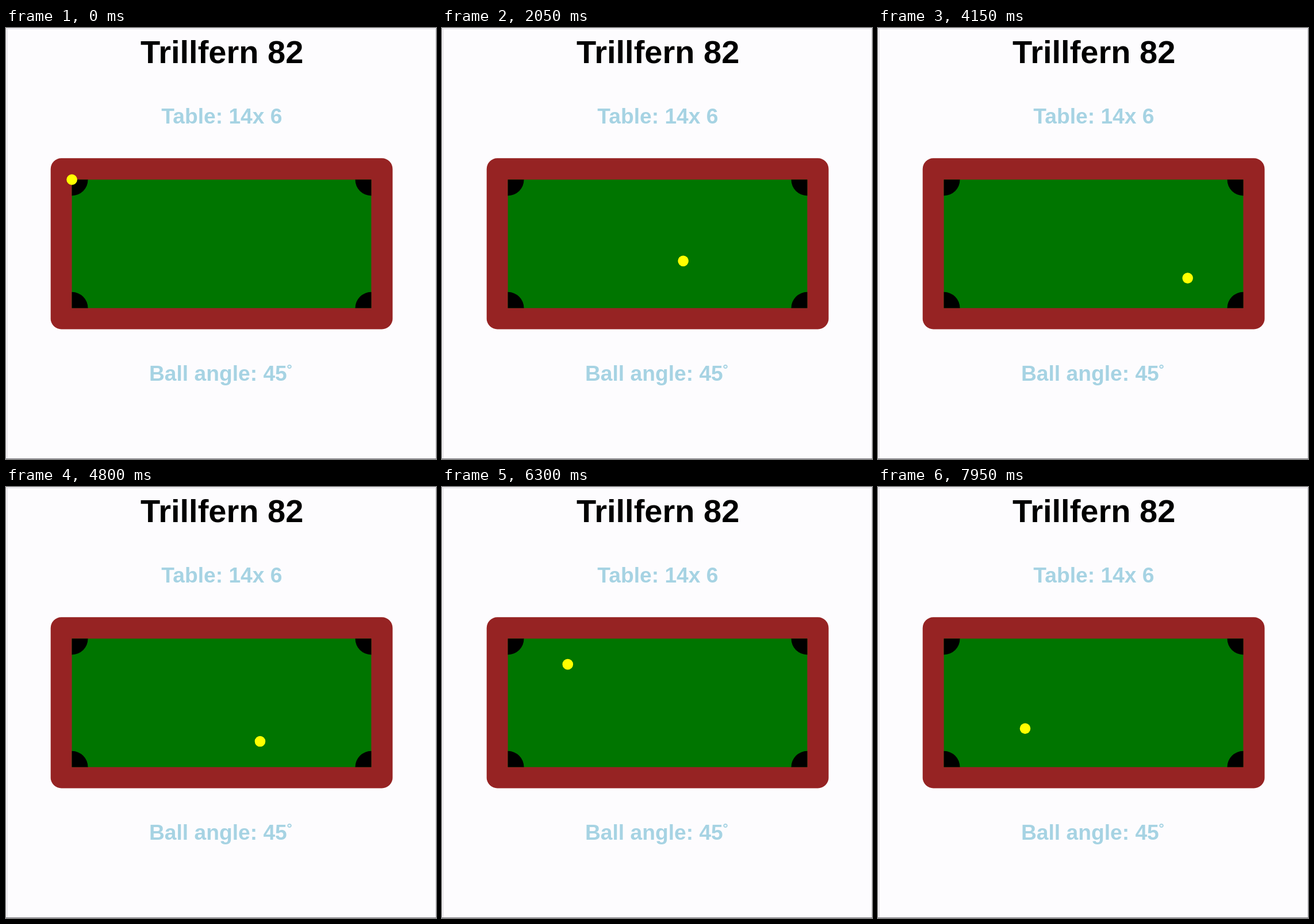
Animation, 748 px wide and 749 px high, one loop 8000 ms. Source, as an HTML page:

```html
<!DOCTYPE html>
<html lang="en">
<head>
<meta charset="utf-8">
<title>Pool table</title>
<style>
  html, body { margin: 0; width: 100%; height: 100%; overflow: hidden; background: #fdfcfe; }
  svg { display: block; width: 100%; height: 100%; }
  text { font: bold 37.2px "Liberation Sans", Arial, sans-serif; fill: #a6d3e3; }
  .title { font-size: 56px; fill: #000; text-anchor: end; }
  .degree { font-size: 30px; }
</style>
</head>
<body>
<svg viewBox="0 0 748 749">
  <defs>
    <clipPath id="felt"><rect x="114.6" y="263.5" width="520.8" height="223.2"/></clipPath>
  </defs>

  <path d="M0 1.5H748M2 1V748M747.5 1V748" fill="none" stroke="#d8d5dc"/>
  <path d="M0 748.5H748" stroke="#77747b"/>

  <text class="title" x="517.3" y="60.5">Trillfern 82</text>
  <text x="270.3" y="165.5">Table: 14x 6</text>
  <text x="249" y="612.5">Ball angle: 45<tspan class="degree" dy="-4">˚</tspan></text>

  <rect x="77.7" y="226.3" width="594.8" height="297.2" rx="18.6" fill="#962323"/>
  <g clip-path="url(#felt)">
    <rect x="114" y="263" width="522" height="225" fill="#007500"/>
    <circle cx="114.6" cy="263.5" r="27.9"/>
    <circle cx="635.4" cy="263.5" r="27.9"/>
    <circle cx="114.6" cy="486.7" r="27.9"/>
    <circle cx="635.4" cy="486.7" r="27.9"/>
  </g>
  <circle id="ball" r="9.3" fill="#ff0"/>
</svg>
<script>
  const LOOP = 8000, STEP = 50;
  const UNIT = 37.2, LEFT = 114.6, TOP = 263.5;
  const COLS = 14, ROWS = 6, SPEED = 0.2; // table units per step
  const ball = document.getElementById('ball');

  // Reflects a straight path back and forth between 0 and size.
  const bounce = (distance, size) => size - Math.abs(distance % (2 * size) - size);

  const start = performance.now();
  function draw(now) {
    const time = Math.max(0, now - start) % LOOP;
    const distance = Math.floor(time / STEP) * SPEED;
    ball.setAttribute('cx', LEFT + UNIT * bounce(distance, COLS));
    ball.setAttribute('cy', TOP + UNIT * bounce(distance, ROWS));
    requestAnimationFrame(draw);
  }
  draw(start);
</script>
</body>
</html>
```
